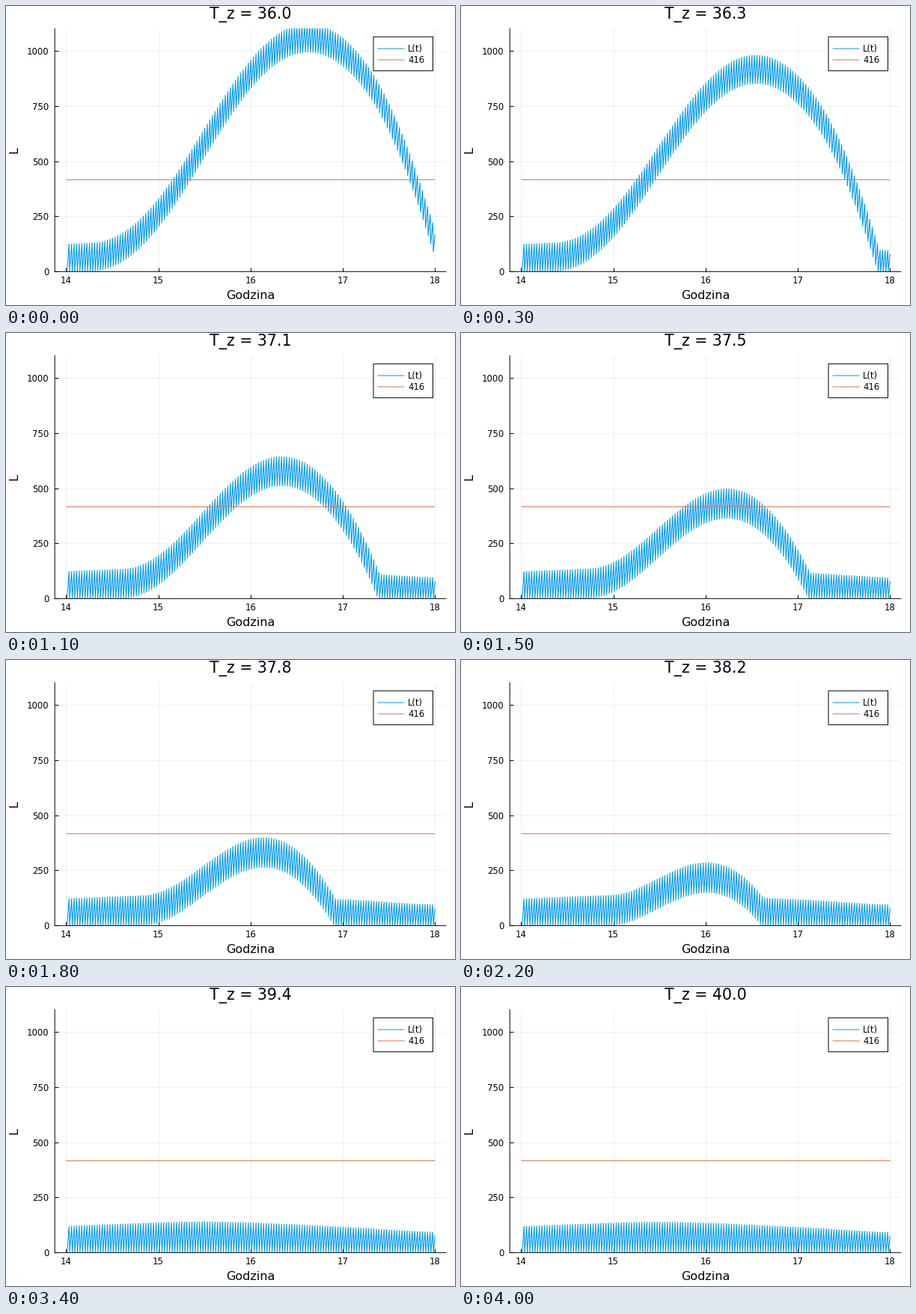
Animation of 600 by 400 pixels, one loop 4100 ms. Source, as a matplotlib script:

```python
import numpy as np
import matplotlib.pyplot as plt
from matplotlib.animation import FuncAnimation
from matplotlib.lines import Line2D
from matplotlib.patches import Rectangle

W, H, DPI = 600, 400, 100
PX = 72 / DPI                      # one pixel in points
BLUE, ORANGE = "#009AFA", "#E36F47"
LEFT, RIGHT, TOP, BOTTOM = 65.2, 588, 30.3, 355.3

CYCLE = 100                        # light cycle in seconds
DELAY = 14.5                       # start-up delay after green begins
LIMIT = 416

plt.rcParams.update({"font.family": "DejaVu Sans", "path.simplify": False})

# Green time that would just balance the traffic, by hour of day
HOURS = [13.8, 14, 14.25, 14.5, 14.75, 15, 15.25, 15.45, 15.75, 16.05, 16.25,
         16.42, 16.6, 16.93, 17.2, 17.5, 17.85, 18, 18.2]
NEED = [34.4, 35.1, 36, 36.75, 37.6, 38.35, 38.92, 39.08, 38.87, 38.12, 37.45,
        36.8, 36.1, 34.8, 33.7, 32.1, 30.4, 30, 29.5]

STEP = 10                          # seconds
wide = np.arange(-600, 15001, STEP)
kernel = np.hanning(43)
smooth = np.convolve(np.interp(14 + wide / 3600, HOURS, NEED),
                     kernel / kernel.sum(), mode="same")
secs = np.arange(0, 14401, STEP)
need = np.interp(secs, wide, smooth)


def queue(green):
    """Corner points of the queue length for one green time."""
    drain = 225 + 11 * (green - 36)    # per hour and second of green
    total = np.cumsum(drain * (need - green)) * STEP / 3600
    rest = total - np.minimum.accumulate(total)

    red = CYCLE + DELAY - green
    low_t = np.arange(144) * CYCLE + green
    high_t = np.minimum(low_t + red, 14400)
    low = np.interp(low_t, secs, rest)
    inflow = 0.069 * (np.interp(high_t, secs, need) - 12)
    high = low + inflow * (high_t - low_t)

    t = np.concatenate([[0], np.column_stack([low_t, high_t]).ravel()])
    y = np.concatenate([[0], np.column_stack([low, high]).ravel()])
    return 14 + t / 3600, y


fig = plt.figure(figsize=(W / DPI, H / DPI), dpi=DPI, facecolor="white")
ax = fig.add_axes([LEFT / W, 1 - BOTTOM / H, (RIGHT - LEFT) / W, (BOTTOM - TOP) / H])
ax.set(xlim=(13.877, 18.12), ylim=(0, 1100),
       xticks=range(14, 19), yticks=range(0, 1001, 250))
ax.set_axisbelow(True)
ax.grid(color="black", alpha=0.1, lw=0.6 * PX)
ax.spines[["top", "right"]].set_visible(False)
for side in ("left", "bottom"):
    ax.spines[side].set(linewidth=PX, snap=False)
ax.tick_params(direction="in", length=5 * PX, width=PX, labelsize=8.4)
ax.tick_params(axis="x", pad=6 * PX)
ax.tick_params(axis="y", pad=8 * PX)


def label(x, y, text, size, **kw):
    return fig.text(x / W, 1 - y / H, text, fontsize=size, **kw)


def pixel_line(x0, x1, y, color):
    fig.add_artist(Line2D([x0 / W, x1 / W], [1 - y / H] * 2, color=color,
                          lw=PX, snap=False, zorder=6))


title = label(327, 17.5, "", 14.8, ha="center")
label(327, 392, "Godzina", 11.55, ha="center")
label(18, 192.5, "L", 11.55, rotation=90, ha="right", va="center")

curve, = ax.plot([], [], color=BLUE, lw=1.1 * PX, solid_joinstyle="bevel")
ax.plot([14, 18], [LIMIT, LIMIT], color=ORANGE, lw=PX, snap=False,
        solid_capstyle="butt")

# Legend
fig.add_artist(Rectangle((491 / W, 1 - 86.7 / H), 79.5 / W, 45.5 / H, fc="white",
                         ec="black", lw=PX, snap=False, zorder=5))
for y, color, text in [(57, BLUE, "L(t)"), (72, ORANGE, str(LIMIT))]:
    pixel_line(497, 532, y, color)
    label(537, y + 4.5, text, 8.4, zorder=6)


def draw(i):
    green = 36 + i / 10
    curve.set_data(*queue(green))
    title.set_text(f"T_z = {green:.1f}")
    return curve, title


anim = FuncAnimation(fig, draw, frames=41, interval=100, repeat=True,
                     repeat_delay=0, blit=False)
plt.show()
```
